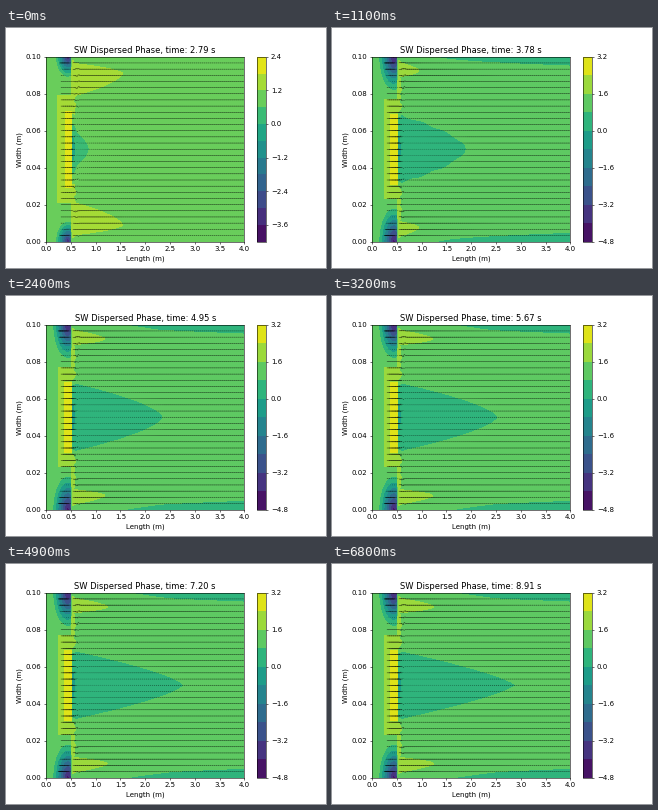
A matplotlib script for the animation above (6.9 s loop, 320 px wide and 240 px high).

```python
import numpy as np
import matplotlib.pyplot as plt
from matplotlib.animation import FuncAnimation

FRAMES, INTERVAL = 69, 100
SURGE = 9     # frames until the flow is fully developed
GATE = 0.52   # position of the jump, m

fig = plt.figure(figsize=(6.4, 4.8), dpi=50)
ax = fig.add_axes([0.125, 0.11, 0.62, 0.77])
cax = fig.add_axes([0.78375, 0.11, 0.028875, 0.77])

X, Y = np.meshgrid(np.linspace(0, 4, 321), np.linspace(0, 0.1, 141))
QX, QY = np.meshgrid(np.arange(0.3, 4, 0.04), np.linspace(0, 0.1, 31)[1:-1])
rng = np.random.default_rng(4)
SWIRL = rng.normal(0, 0.3, QX.shape) * ((QX > 0.5) & (QX < 0.64))


def levels_at(i):
    """Contour levels: whole steps that enclose the speed range."""
    step = 0.6 if i < SURGE else 0.8
    first = -7 if i < SURGE else -6
    last = 5 if 2 <= i < SURGE else 4
    return np.arange(first, last + 1) * step, step


def taper(s, power):
    """Falls from 1 to 0 at s = 1, then slowly below zero."""
    return np.clip(1 - s, 0, 1) ** power - np.clip(s - 1, 0, None) * 0.5


def upstream(x, eta, i):
    k = min(i / SURGE, 1)
    along = np.clip((5.8 + 1.4 * k) * (x - 0.17), 0, 1.9)
    across = 1.9 * (1 - (eta / 0.62) ** 2.7)
    core = (0.63 + 0.37 * k) * np.clip(np.minimum(along, across), 0, None)
    r = np.hypot((x - 0.44) / (0.28 + 0.04 * k),
                 (1 - eta) / (0.25 + 0.135 * k))
    wall = (4.7 + 0.8 * k) * np.clip(1 - r, 0, 1) ** 1.15
    return 1 + core - wall


def wake(x, eta, i, low):
    k = min(i / SURGE, 1)
    tip = 0.87 + 0.02 * i if i < SURGE else 3 - 1.1 * np.exp((11 - i) / 24)
    s = (x - GATE) / (tip - GATE)
    edge = (0.22 + 0.16 * k) * taper(s, 0.55 + 0.2 * i / FRAMES)
    if i >= SURGE:
        edge = edge + 0.012 * np.exp((SURGE - i) / 6) * np.sin(14 * x) * (s < 1)
    u = np.clip(low + 1.5 * (eta - edge), low - 0.4, 1)
    return u - np.exp(-((x - 0.53) / 0.06) ** 2 - (eta / 0.2) ** 2)


def jet(x, eta, i, high):
    if i < SURGE:
        tip, mid, inner = 1.55 + 0.05 * i, 0.83 - 0.01 * i, 0.26
    else:
        tip, mid, inner = 1.26 - 0.3 * np.exp((11 - i) / 8), 0.85, 0.07
    s = (x - GATE) / (tip - GATE)
    depth = np.minimum(eta - mid + inner * taper(s, 0.6),
                       mid + 0.14 * taper(s, 0.7) - eta)
    u = np.clip(high + 3 * depth, 1, high + 0.25)
    ragged = 0.575 + 0.015 * np.sin(70 * eta) + 0.01 * np.sin(31 * eta)
    strip = (x < ragged) & (eta > 0.37) & (eta < 0.96)
    return np.where(strip, np.maximum(u, high + 0.15), u)


def wall_layer(x, eta):
    width = 0.105 * np.sqrt(np.clip((x - 1.3) / 2.7, 0, 1)) - 0.005
    return np.clip(0.8 - 1.2 * (eta - 1 + width), 0.66, 1)


def velocity(x, y, i):
    eta = np.abs(y - 0.05) / 0.05  # 0 on the axis, 1 at the walls
    low, high = (0.6, 1.2) if i < SURGE else (0.8, 1.6)
    down = np.minimum(wake(x, eta, i, low), wall_layer(x, eta))
    down = down + jet(x, eta, i, high) - 1
    return np.where(x < GATE, upstream(x, eta, i), down)


def draw(i):
    ax.clear()
    cax.clear()
    levels, step = levels_at(i)
    u = np.clip(velocity(X, Y, i), levels[0] + 0.01, levels[-1] - 0.01)
    filled = ax.contourf(X, Y, u, levels=levels, cmap="viridis")
    ticks = [v for v in levels if round(v / step) % 2 == 0]
    fig.colorbar(filled, cax=cax, ticks=ticks)
    ax.quiver(QX, QY, velocity(QX, QY, i), SWIRL, width=0.002,
              headwidth=1.5, headlength=2, headaxislength=2)
    ax.set(xlim=(0, 4), ylim=(0, 0.1), xlabel="Length (m)", ylabel="Width (m)",
           title=f"SW Dispersed Phase, time: {2.79 + 0.09 * i:.2f} s")
    return []


anim = FuncAnimation(fig, draw, frames=FRAMES, interval=INTERVAL,
                     init_func=lambda: [], repeat=True, repeat_delay=0)
plt.show()
```
